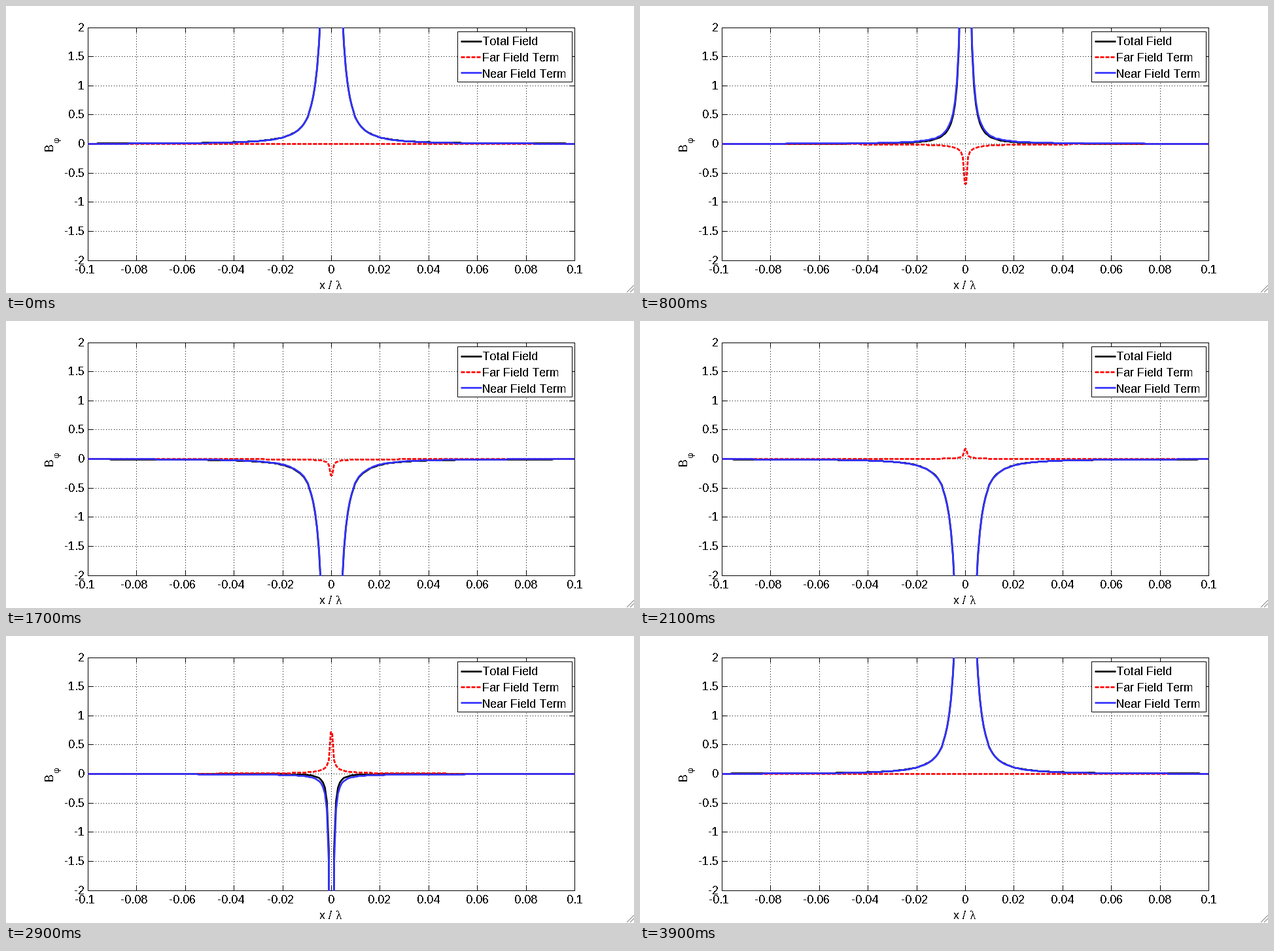
Animation of 960 by 440 pixels, one loop 4000 ms. Source, as a matplotlib script:

```python
import numpy as np
import matplotlib.pyplot as plt
from matplotlib.animation import FuncAnimation
from matplotlib.patches import Rectangle

W, H, DPI = 960, 440, 80
PT = 72 / DPI                      # points per pixel
FRAMES, INTERVAL = 40, 100
LEFT, RIGHT, TOP, BOTTOM = 125, 869, 33, 390
MID_X, MID_Y = 497, 211
SCALE_X, SCALE_Y = 3720, 89.2      # pixels per data unit
BLACK, RED, BLUE = "black", "#ff0000", "#3333ff"

plt.rcParams.update({
    "text.hinting": "force_autohint",
    "text.hinting_factor": 1,
    "lines.scale_dashes": False,
    "path.simplify": False,
    "path.snap": False,
})

fig = plt.figure(figsize=(W / DPI, H / DPI), dpi=DPI, facecolor="white")
ax = fig.add_axes([0, 0, 1, 1])
ax.set_xlim(0, W)
ax.set_ylim(H, 0)
ax.axis("off")


def line(xs, ys, color=BLACK, width=1, dash=None, **kw):
    """Line through pixel centres."""
    style = (0, [d * PT for d in dash]) if dash else "-"
    cap = "projecting" if width == 1 else "butt"
    return ax.plot(np.asarray(xs) + 0.5, np.asarray(ys) + 0.5, color=color,
                   lw=width * PT, ls=style, solid_capstyle=cap,
                   dash_capstyle="butt", solid_joinstyle="round",
                   dash_joinstyle="round", **kw)[0]


def label(x, y, text, ha="left", px=17.5, font="Liberation Sans", **kw):
    ax.text(x, y, text, ha=ha, va="baseline", fontsize=px * PT,
            family=font, antialiased=False, **kw)


def frame(x0, y0, x1, y1, **kw):
    ax.add_patch(Rectangle((x0 + 0.5, y0 + 0.5), x1 - x0, y1 - y0, lw=PT,
                           ec=BLACK, snap=False, **kw))


# Grid, ticks and tick labels; dots start on a pixel edge
TICK, DOTS = 7, (1, 3)
for i in range(-5, 6):
    x = int(MID_X + i * 74.4 + 0.5)
    if abs(i) < 5:
        line([x, x], [BOTTOM + 0.5, TOP], dash=DOTS, zorder=1)
    line([x, x], [TOP, TOP + TICK], zorder=1)
    line([x, x], [BOTTOM - TICK, BOTTOM], zorder=1)
    label(x - 4 * (i < 0), 410, f"{i / 50:g}", ha="center")

for j in range(-4, 5):
    y = int(211.5 - j * 44.625)
    if abs(j) < 4:
        line([LEFT - 0.5, RIGHT], [y, y], dash=DOTS, zorder=1)
    line([LEFT, LEFT + TICK], [y, y], zorder=1)
    line([RIGHT - TICK, RIGHT], [y, y], zorder=1)
    label(120, y + 6, f"{j / 2:g}", ha="right")

frame(LEFT, TOP, RIGHT, BOTTOM, fc="none", zorder=2)

# Axis titles
label(479, 434, "x /")
label(504, 434, "λ", px=18, font="Liberation Serif")
turned = dict(rotation=90, rotation_mode="anchor")
label(72, 222, "B", **turned)
label(81, 209, "φ", px=14, font="Liberation Serif", **turned)

# Curves
styles = [
    ("Total Field", dict(color=BLACK, width=2.7)),
    ("Far Field Term", dict(color=RED, width=2.7, dash=(6, 2))),
    ("Near Field Term", dict(color=BLUE, width=2.7)),
]
clip = Rectangle((LEFT, TOP), RIGHT - LEFT + 1, BOTTOM - TOP + 1,
                 transform=ax.transData)
curves = []
for n, (_, style) in enumerate(styles):
    curve = line([], [], zorder=3 + n, **style)
    curve.set_clip_path(clip)
    curves.append(curve)

# Legend
frame(690, 39, 865, 116, fc="white", zorder=7)
for n, (name, style) in enumerate(styles):
    y = 54 + 24 * n
    line([695, 727], [y, y], zorder=8, **style)
    label(728, 60 + 25 * n, name, zorder=8)

# Resize grip in the corner
for size in (10, 5):
    line([959 - size, 959], [438, 438 - size], color="#808080")

# Dipole field along x, in wavelengths
x = np.linspace(-0.1, 0.1, 256)
r = np.abs(x)
k = 2 * np.pi
MOMENT = 4.48e-5
pixel_x = np.round(MID_X + SCALE_X * x) + 0.5


def update(i):
    phase = k * r - 2 * np.pi * i / (FRAMES - 1)
    near = MOMENT * np.cos(phase) / r**2
    far = MOMENT * k * np.sin(phase) / r
    for curve, field in zip(curves, (near + far, far, near)):
        curve.set_data(pixel_x, np.round(MID_Y - SCALE_Y * field) + 0.5)
    return curves


anim = FuncAnimation(fig, update, frames=FRAMES, interval=INTERVAL,
                     repeat=True, repeat_delay=0, blit=False)
plt.show()
```
